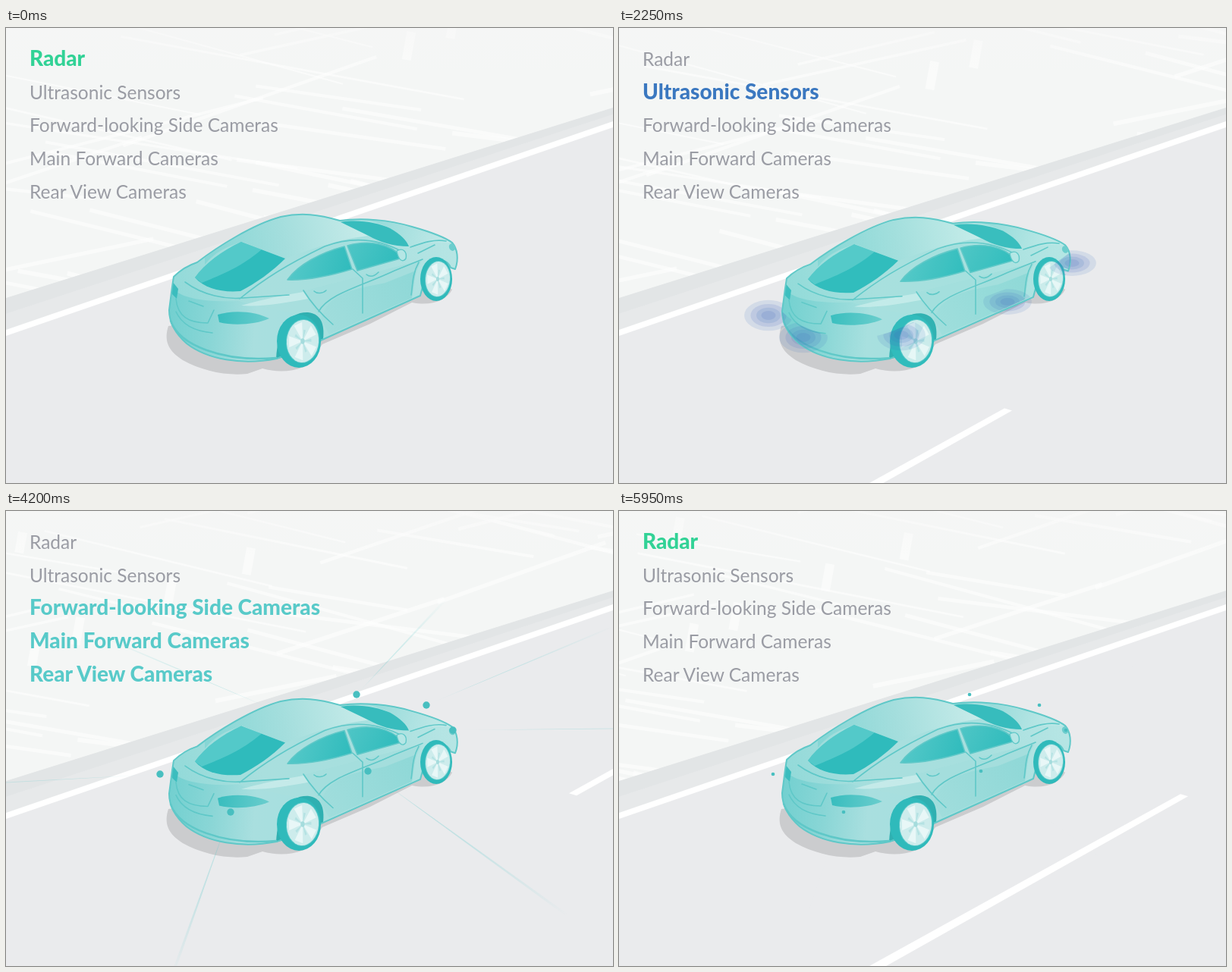
An HTML page with a canvas for the animation above (6 s loop, 800 px wide and 600 px high).

```html
<!DOCTYPE html>
<html lang="en">
<head>
<meta charset="utf-8">
<title>Car sensors</title>
<style>
html, body { margin: 0; width: 100%; height: 100%; overflow: hidden; background: #eaebed; }
canvas { position: absolute; left: 0; top: 0; width: 800px; height: 600px; }
.label { position: absolute; left: 31px; font: 24.5px/30px Lato, "Open Sans", sans-serif; color: #9a9ca4; white-space: nowrap; }
.label.on { font-size: 28px; font-weight: 800; transform: translateY(-2px); }
</style>
</head>
<body>
<canvas id="stage" width="800" height="600"></canvas>
<script>
const ctx = document.getElementById('stage').getContext('2d');
const LOOP = 6000, STEP = 50, TAU = Math.PI * 2;
const TEAL = '86,199,200';

// Labels: text, phase index, baseline
const PHASE_START = [5800, 1800, 3800];
const PHASE_COLOR = ['#32d296', '#3b78c0', '#58cac9'];
const labels = [
  ['Radar', 0, 50], ['Ultrasonic Sensors', 1, 94], ['Forward-looking Side Cameras', 2, 137],
  ['Main Forward Cameras', 2, 181], ['Rear View Cameras', 2, 225]
].map(([text, phase, base]) => {
  const el = document.createElement('div');
  el.className = 'label';
  el.textContent = text;
  el.style.top = base - 24.5 + 'px';
  document.body.appendChild(el);
  return { el, phase };
});

const clamp = v => Math.max(0, Math.min(1, v));
const smooth = v => { v = clamp(v); return v * v * (3 - 2 * v); };
const mod = (a, n) => ((a % n) + n) % n;
const since = (t, phase) => mod(t - PHASE_START[phase], LOOP);
const swell = (s, from, dur) => smooth((s - from) / dur) * (1 - smooth((s - 1680) / 480));

function track(keys, t) {
  let i = 1;
  while (i < keys.length - 1 && keys[i][0] < t) i++;
  const [t0, a] = keys[i - 1], [t1, b] = keys[i];
  return a + (b - a) * clamp((t - t0) / (t1 - t0));
}
const TRAVEL = [[0, 0], [1200, 1670], [2250, 2697], [3200, 4208], [4200, 5823], [4700, 6470], [5950, 8225], [6000, 8295]];
const BOB = [[0, 0], [1200, 1.5], [2250, 4], [3200, -1.5], [4200, 2], [4700, 1], [5950, 0], [6000, 0]];

let seed = 11;
const rnd = () => (seed = (seed * 16807) % 2147483647) / 2147483647;

function poly(pts, fill) {
  ctx.beginPath();
  pts.forEach(([x, y]) => ctx.lineTo(x, y));
  ctx.closePath();
  if (fill) { ctx.fillStyle = fill; ctx.fill(); }
}
function oval(x, y, rx, ry, fill, rot = 0) {
  ctx.beginPath();
  ctx.ellipse(x, y, rx, ry, rot, 0, TAU);
  ctx.fillStyle = fill;
  ctx.fill();
}
function blend(x0, y0, x1, y1, ...colors) {
  const g = ctx.createLinearGradient(x0, y0, x1, y1);
  colors.forEach((c, i) => g.addColorStop(i / (colors.length - 1), c));
  return g;
}

// Streets beside the road
const streets = Array.from({ length: 74 }, (_, i) => {
  const strip = i % 9 === 0, depth = rnd();
  return {
    x: rnd() * 1500, c: depth * 365,
    angle: strip ? 1.75 : i % 3 ? 0.1 + rnd() * 0.17 : -0.2 - rnd() * 0.16,
    len: strip ? 25 + depth * 25 : 160 + rnd() * 300,
    width: strip ? 12 : 2 + depth * 4
  };
});

function drawGround(dist) {
  ctx.fillStyle = '#eaebed';
  ctx.fillRect(0, 0, 800, 600);
  ctx.save();
  poly([[0, 0], [800, 0], [800, 106], [0, 357]], '#f4f6f5');
  ctx.clip();
  ctx.strokeStyle = 'rgba(255,255,255,.55)';
  for (const s of streets) {
    const x = mod(s.x - dist * 0.6, 1500) - 400, y = s.c - x * 0.33;
    ctx.lineWidth = s.width;
    ctx.beginPath();
    ctx.moveTo(x, y);
    ctx.lineTo(x + Math.cos(s.angle) * s.len, y + Math.sin(s.angle) * s.len);
    ctx.stroke();
  }
  ctx.fillStyle = blend(0, 0, 0, 60, 'rgba(246,246,246,.6)', 'rgba(246,246,246,0)');
  ctx.fillRect(0, 0, 800, 60);
  ctx.restore();
  poly([[0, 356], [800, 105], [800, 114], [0, 377]], '#e2e5e6');
  poly([[0, 377], [800, 114], [800, 124], [0, 399]], '#e7e9ea');
  poly([[0, 398], [800, 123], [800, 131], [0, 406]], '#fff');
}

function drawDashes(dist) {
  const gap = 960, len = 480;
  const edge = x => 600 - 0.553 * (x - 330);
  const cap = x => 10 + 8 * clamp((450 - x) / 120);
  for (let far = mod(325 - dist, gap); far < 1400; far += gap) {
    const near = far - len;
    poly([[near, edge(near)], [far, edge(far)], [far + cap(far), edge(far) + 3], [near + cap(near), edge(near) + 3]], '#fff');
  }
}

const shadow = new Path2D('M214 393 C208 412 213 425 233 438 C258 452 290 459 318 456 L338 449 C355 454 375 454 392 447 L417 417 L480 390 L535 362 C560 367 580 360 588 345 L560 320 L300 380 Z');

// Radar
function drawRadar(t) {
  const k = swell(since(t, 0), 300, 700);
  if (k < 0.005) return;
  const ax = 550, ay = 263, at = (x, y) => [ax + (x - ax) * k, ay + (y - ay) * k];
  poly([[ax, ay], at(812, 124), at(812, 211)], blend(ax, ay, ...at(812, 165), 'rgba(90,210,168,.3)', 'rgba(90,210,168,.25)'));
  poly([at(738, 163), at(812, 124), at(812, 158)], 'rgba(50,200,150,.26)');
  poly([at(738, 163), at(812, 158), at(812, 184)], 'rgba(235,248,240,.22)');
}

// Ultrasonic rings
const sensors = [[197, 379], [243, 408], [372, 405], [512, 361], [597, 310], [302, 340], [440, 312]];
function drawRings(k) {
  const grown = smooth((k - 0.15) / 0.4);
  sensors.forEach(([x, y], i) => {
    if (i > 4 && k < 0.25) return;
    [1, 0.74, 0.5, 0.3].forEach((f, j) => {
      const a = j ? 0.1 : 0.085;
      const tint = j % 2 ? '70,100,185' : '62,112,190';
      oval(x, y, 204 * f * k, (108 + 22 * (i < 3)) * f * k, `rgba(${tint},${a + 0.05 * (1 - grown)})`);
    });
  });
}

// Camera beams: apex, centre, first and last edge, squash, reach
const beams = [
  [[462, 242], [555, 143], [320, 183], [800, 207], 0.37, 360],
  [[554, 256], [770, 165], [500, 135], [800, 268], 0.42, 350],
  [[589, 289], [800, 287], [800, 150], [800, 405], 0.6, 370],
  [[477, 343], [715, 515], [800, 339], [352, 533], 0.64, 400],
  [[296, 397], [225, 595], [575, 540], [0, 493], 0.64, 350],
  [[203, 347], [0, 358], [0, 437], [0, 262], 0.6, 350],
  [[362, 266], [165, 182], [0, 280], [415, 150], 0.36, 380]
];
function drawBeam([[x, y], mid, first, last, squash, reach], open, grow) {
  const angle = p => Math.atan2((p[1] - y) / squash, p[0] - x);
  const m = angle(mid);
  const before = mod(m - angle(first), TAU), after = mod(angle(last) - m, TAU);
  const r = reach * grow, o = Math.max(open, 0.006);
  const g = ctx.createRadialGradient(0, 0, 0, 0, 0, r);
  const thin = 1 - smooth(open * 5);
  const stop = (at, alpha) => g.addColorStop(at, `rgba(${TEAL},${alpha})`);
  stop(0, 0.48 * (1 - thin));
  stop(0.25, 0.37 - 0.1 * thin);
  stop(0.5, 0.23);
  stop(0.75, 0.11);
  stop(1, 0);
  ctx.save();
  ctx.translate(x, y);
  ctx.scale(1, squash);
  ctx.beginPath();
  ctx.moveTo(0, 0);
  ctx.arc(0, 0, r, m - before * o, m + after * o);
  ctx.closePath();
  ctx.fillStyle = g;
  ctx.fill();
  ctx.restore();
}
const beamOpen = t => swell(since(t, 2), 390, 470);
function drawBeams(t, list) {
  const s = since(t, 2);
  if (s < 200 || s > 2150) return;
  const grow = smooth((s - 150) / 260);
  ctx.save();
  ctx.globalAlpha *= 1 - smooth((s - 2000) / 160);
  list.forEach(b => drawBeam(b, beamOpen(t), grow));
  ctx.restore();
}
function drawDots(t) {
  const s = since(t, 2);
  const r = 4.7 * smooth((s - 50) / 250) * (1 - smooth((s - 2100) / 100));
  if (r > 0.05) beams.slice(0, 6).forEach(([[x, y]]) => oval(x, y, r, r, '#48bfc0'));
}

// Car
const body = new Path2D('M219 341 L221 328 C230 319 240 313 252 309 C278 289 325 259 362 249 C390 243 412 246 440 254 C470 250 505 253 535 262 C560 269 580 277 588 283 C595 291 597 305 592 318 L586 316 C580 300 560 304 552 330 L546 353 L417 411 L357 436 C310 445 265 437 238 416 C222 402 215 388 215 372 Z');
const solid = new Path2D(body);
[[387, 414, 30, 35], [568, 331, 21, 29]].forEach(([x, y, rx, ry]) => {
  const tyre = new Path2D();
  tyre.ellipse(x, y, rx, ry, 0, 0, TAU);
  solid.addPath(tyre);
});
const art = {
  bumper: new Path2D('M219 341 C226 356 262 362 306 360 C330 366 356 372 385 377 C367 390 360 410 357 436 C310 445 265 437 238 416 C222 402 215 388 215 372 Z'),
  roof: new Path2D('M262 303 C300 274 340 255 375 247 C426 245 452 259 477 274 C440 278 404 291 368 304 L312 282 C290 288 275 296 262 312 Z'),
  rear: new Path2D('M310 282 L368 304 C350 322 330 336 309 347 C285 349 262 344 249 329 C262 311 284 294 310 282 Z'),
  shine: new Path2D('M310 282 L337 292 C310 315 285 325 258 336 L249 329 C262 311 284 294 310 282 Z'),
  glass: new Path2D('M441 256 C465 252 490 257 506 264 C520 272 528 280 531 288 C510 288 492 282 478 274 Z'),
  hood: new Path2D('M475 253 C505 253 555 267 586 283 C565 281 548 285 533 289 C522 272 505 260 475 253 Z'),
  back: new Path2D('M371 332 C385 312 415 296 446 288 L456 318 C430 326 400 333 371 332 Z'),
  front: new Path2D('M450 287 C478 279 507 284 523 303 L463 320 Z'),
  side: new Path2D('M392 347 L548 306 C538 325 536 342 534 356 L426 404 C410 376 400 362 392 347 Z'),
  low: new Path2D('M415 384 C424 350 455 345 500 336 L540 320 L535 356 L426 404 Z'),
  lamp: new Path2D('M279 378 C300 371 330 374 347 383 C330 391 300 393 281 388 Z'),
  lampL: new Path2D('M219 334 L227 344 L225 357 L219 351 Z'),
  arch: new Path2D('M356 436 C358 398 372 374 398 375 C415 377 420 390 418 410 L400 430 Z'),
  lines: new Path2D('M308 357 C340 331 370 312 420 288 C455 275 490 277 524 296 M457 318 L470 330 L470 376 M392 346 C402 362 416 378 431 391 M412 374 C425 350 470 340 512 320 L549 305 M544 309 C535 325 536 340 534 352 M236 335 C260 353 290 358 312 356 L373 352 M224 357 C226 380 240 389 266 389 L274 372 M224 374 C232 392 250 400 272 402 M241 360 L260 367 M406 347 C410 351 418 350 422 346 M475 325 C480 329 486 327 491 322 M533 289 C550 283 565 278 580 281 M543 297 L565 286'),
  skirt: new Path2D('M217 386 C228 418 285 441 356 435'),
  gleam: new Path2D('M310 366 C345 356 370 352 392 348 L398 357 C370 362 340 368 310 366 Z'),
  mirror: new Path2D('M515 294 C523 289 529 295 527 304 C523 310 517 306 515 294 Z')
};

function wheel(x, y, rx, ry, ix, iy, dx) {
  oval(x, y, rx, ry, '#2fbabb');
  oval(x + dx, y, ix + 1, iy + 1, '#58c7c8', 0.08);
  oval(x + dx, y, ix, iy, '#cdecec', 0.08);
  ctx.save();
  ctx.translate(x + dx, y);
  ctx.scale(ix, iy);
  for (let i = 0; i < 5; i++) {
    const a = i * TAU / 5 + 0.3;
    const spoke = (from, to, r, color) =>
      poly([[0, 0], [Math.cos(from) * r, Math.sin(from) * r], [Math.cos(to) * r, Math.sin(to) * r]], color);
    spoke(a, a + 0.6, 0.9, '#e8f7f7');
    spoke(a + 0.75, a + 1, 0.55, '#b4e2e3');
  }
  oval(0, 0, 0.13, 0.13, '#a5dcdd');
  ctx.restore();
}

function fill(part, style) {
  ctx.fillStyle = style;
  ctx.fill(part);
}

function drawCar(bob) {
  ctx.save();
  ctx.translate(0, 440);
  ctx.scale(1, 1 - bob / 195);
  ctx.translate(0, -440);
  fill(body, blend(220, 400, 590, 290, '#8fd9d8', '#a9dfde', '#a6dfde', '#b6e5e4'));
  fill(art.bumper, blend(216, 380, 385, 395, '#73d0d0', '#8ad6d6', '#a9dfdf', '#a6dfdf'));
  fill(art.roof, blend(265, 300, 470, 262, '#86d6d5', '#a4dedd', '#c6ebe9'));
  fill(art.side, '#a4dedd');
  fill(art.low, blend(420, 390, 540, 330, '#a0dddc', '#8fd8d7'));
  fill(art.gleam, 'rgba(220,244,243,.55)');
  fill(art.hood, blend(470, 252, 580, 285, '#8ed8d7', '#c2e9e8'));
  fill(art.rear, '#2fbbbc');
  fill(art.shine, 'rgba(120,215,215,.5)');
  fill(art.glass, '#37bcbd');
  fill(art.back, blend(375, 300, 455, 325, '#56c9c9', '#2fbbbc'));
  fill(art.front, blend(450, 282, 515, 315, '#4fc6c6', '#2fbbbc'));
  fill(art.lamp, blend(279, 380, 347, 384, '#38bdbe', '#6acdcd'));
  fill(art.lampL, '#3bbdbe');
  fill(art.arch, '#2fb0b1');
  ctx.lineJoin = ctx.lineCap = 'round';
  ctx.strokeStyle = '#5fc8c8';
  ctx.lineWidth = 1.6;
  ctx.stroke(art.lines);
  ctx.stroke(art.back);
  ctx.stroke(art.front);
  ctx.lineWidth = 2;
  ctx.stroke(body);
  ctx.lineWidth = 2.5;
  ctx.stroke(art.skirt);
  ctx.lineWidth = 1.4;
  fill(art.mirror, '#b5e6e5');
  ctx.stroke(art.mirror);
  oval(588, 289, 4, 5, '#6dcdcd', -0.4);
  ctx.restore();
  wheel(386, 413, 29, 35, 21, 28, 5);
  wheel(567, 331, 21, 29, 16, 23, 2);
}

// Pale rim where the sensor cover is cut out behind the car
const lower = new Path2D('M190 368 L216 375 C235 394 275 411 320 409 C355 406 375 393 400 382 L470 359 L548 330 L600 292 L640 300 L620 480 L190 480 Z');
const upper = new Path2D('M190 368 L216 375 L400 370 L548 320 L600 305 L630 300 L600 200 L180 200 Z');
const roofside = new Path2D('M285 200 H410 V300 H285 Z');
function drawRim(region, color, width, alpha) {
  ctx.save();
  ctx.clip(region);
  ctx.globalAlpha = alpha;
  ctx.translate(-3, -1);
  ctx.strokeStyle = color;
  ctx.lineWidth = width;
  ctx.stroke(body);
  ctx.restore();
}

function draw(t) {
  const dist = track(TRAVEL, t), bob = track(BOB, t);
  const ring = swell(since(t, 1), 300, 600);
  drawGround(dist);
  drawDashes(dist);
  fill(shadow, '#cbccce');
  drawRadar(t);
  drawBeams(t, beams);
  drawRim(roofside, '#f1f3f3', 20, smooth(beamOpen(t) * 2 - 0.5));
  if (ring > 0.005) {
    drawRings(ring);
    drawRim(upper, '#e9eaed', 16, smooth((ring - 0.3) * 2));
  }
  drawCar(bob);
  if (ring > 0.005) {
    ctx.save();
    ctx.clip(solid);
    ctx.save();
    ctx.globalAlpha = 0.14 * ring;
    fill(solid, '#7ff0d8');
    ctx.restore();
    ctx.clip(lower);
    drawRings(ring);
    ctx.restore();
  }
  ctx.save();
  ctx.globalAlpha = 0.15;
  drawBeams(t, beams.slice(3, 5));
  ctx.restore();
  drawDots(t);
  const active = PHASE_START.findIndex((_, i) => since(t, i) < 2000);
  labels.forEach(({ el, phase }) => {
    const on = phase === active;
    el.classList.toggle('on', on);
    el.style.color = on ? PHASE_COLOR[phase] : '';
  });
}

const begin = performance.now();
function tick() {
  const t = (performance.now() - begin) % LOOP;
  draw(Math.floor(t / STEP) * STEP);
  requestAnimationFrame(tick);
}
tick();
</script>
</body>
</html>
```
